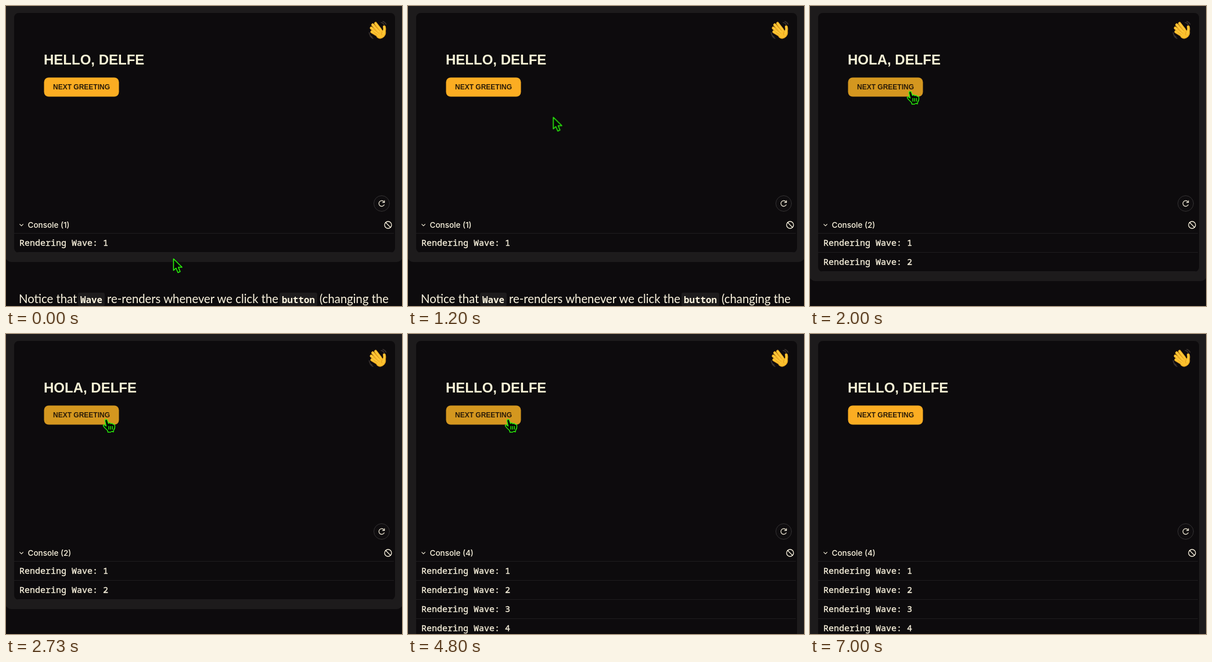
An HTML page for the animation above (7.07 s loop, 682 by 518 pixels).

```html
<!DOCTYPE html>
<html lang="en">
<head>
<meta charset="utf-8">
<title>Greeting</title>
<style>
  /* --n counts the clicks and drives the greeting, the counter and the console height */
  @property --n { syntax: '<integer>'; inherits: true; initial-value: 0; }

  :root { --loop: 7.07s; --page: #0d0b0d; --shell: #1d1b1c; --cream: #fbf4df; }
  html, body { margin: 0; width: 100%; height: 100%; overflow: hidden; background: var(--page); }

  .stage {
    position: relative; width: 682px; height: 518px; overflow: hidden;
    background: var(--page); color: var(--cream);
    animation: clicks var(--loop) step-end infinite;
  }
  .stage > *, .panel > *, .note > * { position: absolute; white-space: nowrap; }

  .shell {
    left: -2px; right: -2px; top: -20px; border-radius: 12px; background: var(--shell);
    height: calc(462px + var(--n) * 33px);
  }
  .panel {
    left: 14px; top: 12px; width: 656px; height: calc(414px + var(--n) * 33px);
    border-radius: 8px; background: var(--page); overflow: hidden;
  }

  .reel { overflow: hidden; }
  .reel div { margin-top: calc(var(--n) * -1lh); }
  .reel span { display: block; }
  .title {
    left: 51px; top: 67px; width: 400px; height: 27px; color: #f7f3d6;
    font: bold 24px/27px "Liberation Sans", Arial, sans-serif;
  }
  .next {
    left: 51px; top: 111px; width: 130px; height: 34px; clip-path: inset(.5px round 8px);
    background: #fbad22; color: #2a1b08; text-align: center;
    font: bold 12px/34px "Liberation Sans", Arial, sans-serif;
    animation: hover var(--loop) linear infinite;
  }
  .count {
    left: 23.5px; top: 358px; width: 120px; height: 16px;
    font: 500 13.5px/16px Inter, sans-serif;
  }
  .rows {
    left: 0; top: 380px; width: 654px;
    font: 15px/30px "Noto Sans Mono", monospace; -webkit-text-stroke: .35px;
  }
  .rows div { height: 32px; padding-left: 9px; border-top: 1px solid #1f1d1f; }

  .note {
    left: 0; top: calc(493px + var(--n) * 33px); width: 682px; height: 24px; margin: 0;
    font: 20.3px/24px Lato, sans-serif;
  }
  .note code {
    top: 2px; height: 23px; padding: 0 4px; border-radius: 3px; background: var(--shell);
    font: 600 15.8px/24px "Noto Sans Mono", monospace;
  }

  svg { overflow: visible; fill: none; stroke-linecap: round; stroke-linejoin: round; }
  .icon { left: 0; top: 0; stroke: var(--cream); stroke-width: 1.3; }

  .cursor {
    left: 0; top: 0; width: 1px; height: 1px;
    fill: #050505; stroke: #2bf50c; stroke-width: 1.6;
    animation: move var(--loop) linear infinite;
  }
  .arrow { animation: arrow var(--loop) step-end infinite; }
  .hand { stroke-width: 1.4; animation: hand var(--loop) step-end infinite; }

  @keyframes clicks {
    0% { --n: 0; }
    27.28% { --n: 1; }
    41.42% { --n: 2; }
    55.57%, 100% { --n: 3; }
  }
  @keyframes hover {
    0%, 20.5% { background: #fbad22; }
    22.65%, 76.2% { background: #d4971f; }
    78.7%, 100% { background: #fbad22; }
  }
  @keyframes arrow {
    0% { opacity: 1; }
    20.5% { opacity: 0; }
    76.2%, 100% { opacity: 1; }
  }
  @keyframes hand {
    0% { opacity: 0; }
    20.5% { opacity: 1; }
    76.2%, 100% { opacity: 0; }
  }
  @keyframes move {
    0% { transform: translate(288px, 436px); }
    2.8% { transform: translate(282px, 441px); }
    6.6% { transform: translate(282px, 441px); animation-timing-function: ease-in; }
    8.49% { transform: translate(335px, 398px); }
    9.47% { transform: translate(384px, 345px); animation-timing-function: ease-out; }
    11.3% { transform: translate(414px, 281px); }
    13.2% { transform: translate(414px, 281px); animation-timing-function: cubic-bezier(.35, 0, .25, 1); }
    21.64% { transform: translate(175px, 151px); }
    23.6%, 75.4% { transform: translate(172px, 148px); }
    76.38% { transform: translate(158px, 185px); }
    77.32% { transform: translate(112px, 320px); }
    78.26% { transform: translate(54px, 453px); }
    79.2%, 100% { transform: translate(10px, 560px); }
  }
</style>
</head>
<body>
<main class="stage">
  <div class="shell"></div>
  <section class="panel">
    <div class="reel title"><div>
      <span>HELLO, DELFE</span><span>HOLA, DELFE</span><span>BONJOUR, DELFE</span><span>HELLO, DELFE</span>
    </div></div>
    <div class="next">NEXT GREETING</div>
    <div class="reel count"><div>
      <span>Console (1)</span><span>Console (2)</span><span>Console (3)</span><span>Console (4)</span>
    </div></div>
    <div class="rows">
      <div>Rendering Wave: 1</div>
      <div>Rendering Wave: 2</div>
      <div>Rendering Wave: 3</div>
      <div>Rendering Wave: 4</div>
    </div>
  </section>

  <p class="note">
    <span style="left:22px">Notice that</span>
    <code style="left:124px">Wave</code>
    <span style="left:174px">re-renders whenever we click the</span>
    <code style="left:471px">button</code>
    <span style="left:540px">(changing the</span>
  </p>

  <svg class="icon" width="682" height="518">
    <!-- waving hand -->
    <path d="M646 28.500q4 .5 5.500 4.500M649 26.500q4 1.500 5.500 5M625.500 46q.5 5 5 7.500M627 51.500q1.500 3 5 4.500" stroke="#3b3330" stroke-width="1.600"/>
    <g stroke="#e39a1c" stroke-width="5">
      <path d="M650 47Q653 42 651.500 36"/>
      <path d="M645 41 636.500 30M642 44 631.500 32.500M640 47 629 38M639 50 630 44.500"/>
    </g>
    <path d="M637 48 645 39 649 43 653 41Q655.500 48 651 53 644.500 59 639 54Z" fill="#fcbf2c" stroke="#e39a1c" stroke-width="1"/>
    <g stroke="#fdc735" stroke-width="3.600">
      <path d="M649.500 47Q652.500 42 651.500 36"/>
      <path d="M645 41 636.500 30M642 44 631.500 32.500M640 47 629 38M640 50 630 44.500"/>
    </g>
    <path d="M636 35 644 43M633 40 642 47M633.500 45.500 640 49.500M648 44q-2 3-1 6" stroke="#dc9119" stroke-width=".8"/>

    <!-- reload -->
    <circle cx="647" cy="341" r="13.500" stroke="#343233" stroke-width="1" fill="#0f0d0f"/>
    <path d="M651.300 343.200A4.800 4.800 0 1 1 650.800 338M651.800 336V339.300H648.500" stroke-width="1.200"/>
    <!-- clear -->
    <circle cx="658" cy="378" r="6"/>
    <path d="M653.800 373.800 662.200 382.200"/>
    <!-- fold -->
    <path d="M23.800 376.800 26.600 379.600 29.400 376.800" stroke-width="1.100"/>
  </svg>

  <svg class="cursor">
    <path class="arrow" d="M.5.5V20.500L4.800 16.500 8.200 24.200 12 22.500 8.800 15H15.200Z"/>
    <g class="hand">
      <path d="M-1.500 2.500C-2-1 2-1.500 2.800 1.500L4.500 6.500C6 4.800 8 5.500 8.500 7 10 5.800 12 6.500 12.500 8 14.500 7.500 15.500 9 15.500 11 16 14 14.500 16.500 13.500 18L13 21 10.500 20 8 21.500H3.500L3 18.800C0 16-3 13-4.500 10.500-4.500 8.500-2 8.500.5 11Z"/>
      <path d="M5.200 11.500V16.500M8.300 11.500V16.500M11.400 11.500V16.500"/>
    </g>
  </svg>
</main>
</body>
</html>
```
